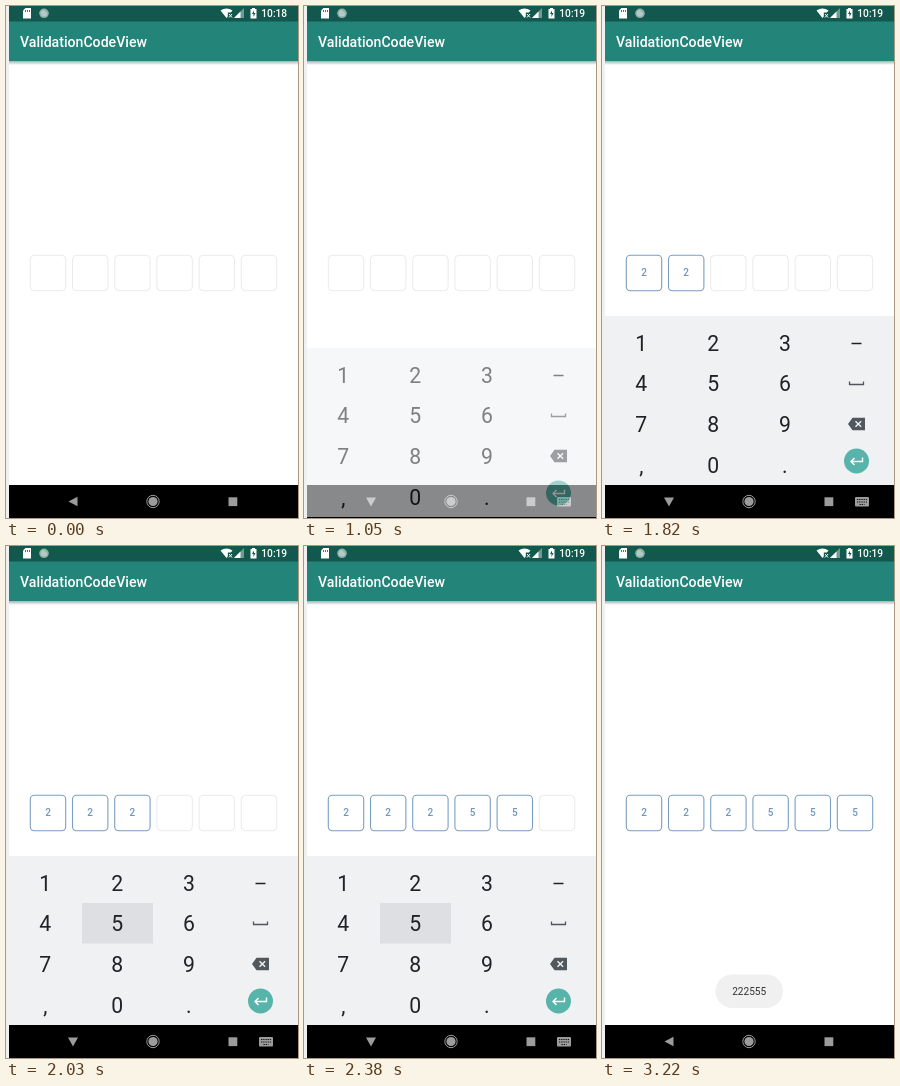
Animation, 292 px wide and 512 px high, one loop 3.36 s. Source, as an HTML page:

```html
<!DOCTYPE html>
<html lang="en">
<head>
<meta charset="utf-8">
<title>Validation code</title>
<style>
html, body { margin: 0; width: 100%; height: 100%; overflow: hidden; background: #fff; }
svg { display: block; width: 100vw; height: 100vh; font-family: Roboto, sans-serif; }
.mid { text-anchor: middle; }
.cell rect { fill: #fff; stroke: #e9eaeb; }
.cell text { font-size: 10px; font-weight: 500; fill: #6f96be; }
.cell.on rect { stroke: #7b9fc1; stroke-width: 1.1; }
.key { font-size: 21.2px; fill: #202225; }
</style>
</head>
<body>
<svg viewBox="0 0 292 512">
  <defs>
    <linearGradient id="shade" x2="0" y2="1">
      <stop stop-color="#9fb5b2"/><stop offset="1" stop-color="#fff"/>
    </linearGradient>
  </defs>
  <rect width="292" height="512" fill="#fff"/>
  <rect y="55" x="3" width="289" height="4" fill="url(#shade)"/>
  <rect x="3" y="15" width="289" height="40" fill="#23857a"/>
  <rect x="3" width="289" height="15.5" fill="#13584e"/>
  <text x="14" y="40.7" font-size="14.1" font-weight="500" fill="#fff">ValidationCodeView</text>

  <!-- status bar -->
  <g fill="#fff">
    <path d="M19.5 2H25V12.500H17V4.500Z"/>
    <path d="M19.500 4v2M21.500 4v2M23.500 4v2" stroke="#13584e" stroke-width=".8"/>
    <circle cx="38" cy="7.300" r="4.800" fill="#8faea8"/>
    <path d="M38 4a3.300 3.300 0 1 0 3.300 3.300" fill="#b4c9c5"/>
    <path d="M214.500 4.500Q220.500 .5 226.500 4.500L224.800 6.500H221.800V10.500L220.500 12Z"/>
    <path d="M223 8l3 3.500m0-3.500l-3 3.500" stroke="#fff"/>
    <path d="M238 2V12H228Z" fill="#6f9a93"/>
    <path d="M234.500 5.500V12H228Z"/>
    <path d="M246 2h3v1h1.500v9.500h-6V3h1.500Z"/>
    <path d="M248 4.500l-2 3.500h1.500v3l2-4H248Z" fill="#13584e"/>
    <text id="clock" x="255.300" y="11" font-size="10.200" font-weight="500"></text>
  </g>

  <g id="cells"></g>

  <!-- navigation bar -->
  <rect x="3" y="479" width="289" height="33" fill="#000"/>
  <g fill="#9c9c9c">
    <path id="back" d="M62.500 495.500L71.500 490.800V500.200Z"/>
    <g id="down">
      <path d="M62 491.500H72L67 500.500Z"/>
      <rect x="253" y="491" width="14" height="9.500" rx="1"/>
      <path d="M255 493.500h10M255 496h10M257.500 498.500h5" stroke="#111" stroke-dasharray="1.300 .9"/>
    </g>
    <circle cx="147" cy="495.500" r="4.600"/>
    <circle cx="147" cy="495.500" r="6.200" fill="none" stroke="#9c9c9c"/>
    <rect x="222.500" y="491.300" width="8.800" height="8.800"/>
  </g>

  <g id="board">
    <rect x="3" y="310" width="289" height="169" fill="#f0f1f3"/>
    <rect id="press" x="76" width="71" height="40.500" fill="#dddfe3"/>
    <g id="keys"></g>
    <path d="M249.500 337.500h10" stroke="#202225" stroke-width="1.500"/>
    <path d="M247.500 375.500v3h14v-3" fill="none" stroke="#50565b" stroke-width="1.300"/>
    <path d="M246 418l4.500-6.300H263V424.300H250.500Z" fill="#50575d"/>
    <path d="M253.500 415.200l5.600 5.600m0-5.600l-5.600 5.600" stroke="#f0f1f3" stroke-width="1.400"/>
    <circle cx="254.500" cy="455" r="12.500" fill="#57b4ab"/>
    <path d="M260.500 451.500v4H249m3.500-3.500l-3.500 3.500l3.500 3.500" fill="none" stroke="#fff" stroke-width="1.400"/>
  </g>

  <g id="toast">
    <rect x="113.500" y="428.500" width="67.500" height="33.500" rx="16.700" fill="#f0f0f0"/>
    <text class="mid" x="147.200" y="448.600" font-size="10.100" fill="#333">222555</text>
  </g>
  <rect width="3" height="512" fill="#f0f0f0"/>
</svg>
<script>
const LOOP = 3360, STEP = 70;
const CODE = '222555';
const taps = [[1470, 1610], [1680, 1750], [1890, 1960], [2030, 2100], [2170, 2240], [2380, 2450]];
const $ = id => document.getElementById(id);
const clamp = v => Math.max(0, Math.min(1, v));
const show = (el, on) => { el.style.display = on ? '' : 'none'; };

$('cells').innerHTML = [...CODE].map((c, i) => {
  const x = 24.3 + i * 42.2;
  return `<g class="cell"><rect x="${x}" y="249.300" width="35.400" height="35.400" rx="4"/>` +
    `<text class="mid" x="${x + 17.7}" y="269.500">${c}</text></g>`;
}).join('');
$('keys').innerHTML = [...'123456789,0.'].map((c, i) =>
  `<text class="key mid" x="${39.3 + i % 3 * 71.8}" y="${344.6 + Math.floor(i / 3) * 40.8}">${c}</text>`
).join('');
const cells = [...document.querySelectorAll('.cell')];

// Keyboard offset and opacity: eases in, then accelerates away
function boardPose(t) {
  if (t < 1050) return [0, 0];
  if (t < 2480) {
    const rest = (1 - clamp((t - 1050) / 210)) ** 2;
    return [32 * rest, 1 - 0.43 * rest];
  }
  const out = ((t - 2480) / 110) ** 2;
  return [12.4 * out, clamp(1 - 0.32 * out)];
}

function draw(t) {
  $('clock').textContent = t < 910 ? '10:18' : '10:19';

  cells.forEach((cell, i) => {
    const on = t >= taps[i][1];
    cell.classList.toggle('on', on);
    show(cell.lastChild, on);
  });

  const held = taps.findIndex(([a, b], i) => t >= a && (t < b || i === 5));
  show($('press'), held >= 0);
  $('press').setAttribute('y', CODE[held] === '5' ? 357 : 316.3);

  const [dy, alpha] = boardPose(t);
  show($('board'), alpha > 0);
  $('board').setAttribute('transform', `translate(0 ${dy})`);
  $('board').setAttribute('opacity', alpha);

  const typing = t >= 980 && t < 2520;
  show($('down'), typing);
  show($('back'), !typing);
  $('toast').setAttribute('opacity', clamp((t - 2550) / 400));
}

const start = performance.now();
function tick() {
  const t = (performance.now() - start) % LOOP;
  draw(Math.floor(t / STEP) * STEP);
  requestAnimationFrame(tick);
}
tick();
</script>
</body>
</html>
```
